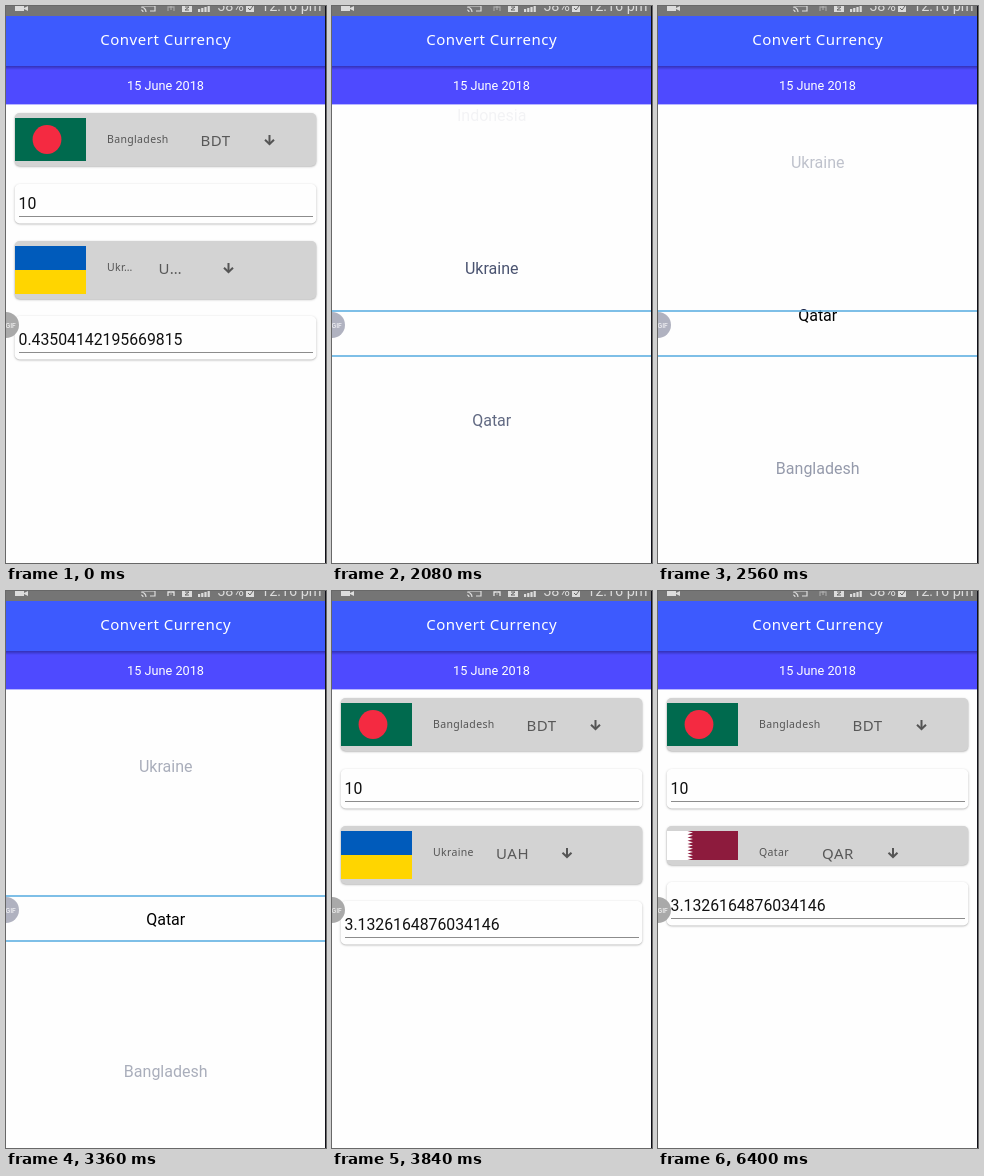
Write an HTML page with a canvas that moves like this. It is 320 by 557 pixels and loops after 9.6 s.

```html
<!DOCTYPE html>
<html lang="en">
<head>
<meta charset="utf-8">
<title>Convert Currency</title>
<style>
html, body { margin: 0; width: 100%; height: 100%; overflow: hidden; background: #fefefe; }
canvas { display: block; width: 320px; height: 557px; }
</style>
</head>
<body>
<canvas id="stage"></canvas>
<script>
const W = 320, H = 557, LOOP = 9600, STEP = 160;
const NOTO = '"Noto Sans", "Open Sans", sans-serif';
const ROBOTO = 'Roboto, Arial, sans-serif';
const canvas = document.getElementById('stage');
const g = canvas.getContext('2d');
const dpr = window.devicePixelRatio || 1;
canvas.width = W * dpr;
canvas.height = H * dpr;

function rect(x, y, w, h, color) {
  g.fillStyle = color;
  g.fillRect(x, y, w, h);
}

function disc(x, y, r, color) {
  g.fillStyle = color;
  g.beginPath();
  g.arc(x, y, r, 0, Math.PI * 2);
  g.fill();
}

function poly(points, color) {
  g.fillStyle = color;
  g.beginPath();
  points.forEach(([x, y]) => g.lineTo(x, y));
  g.fill();
}

function line(points, color, width) {
  g.strokeStyle = color;
  g.lineWidth = width;
  g.beginPath();
  points.forEach(([x, y]) => g.lineTo(x, y));
  g.stroke();
}

function text(str, x, y, size, family, color, align = 'left') {
  g.font = `${size}px ${family}`;
  g.letterSpacing = family === NOTO ? `${size / 30}px` : '0px';
  g.textAlign = align;
  g.fillStyle = color;
  g.fillText(str, x, y);
}

function card(y, h, color) {
  g.save();
  g.shadowColor = 'rgba(0,0,0,.3)';
  g.shadowBlur = 2 * dpr;
  g.shadowOffsetY = 0.8 * dpr;
  g.fillStyle = color;
  g.beginPath();
  g.roundRect(8.7, y, 301.6, h, 5);
  g.fill();
  g.restore();
}

function statusBar(t) {
  const ink = '#dcdcdc';
  rect(0, 0, W, 10, '#757575');
  rect(9, 0, 9, 5, ink);
  poly([[18, 2], [22, 0], [22, 5], [18, 3]], ink);

  line([[136, 0], [149, 0], [149, 5], [144, 5]], ink, 1.2);
  for (const r of [2, 5]) {
    g.beginPath();
    g.arc(135, 6, r, -Math.PI / 2, 0);
    g.stroke();
  }

  const active = t >= 3360 && t < 6400;
  line([[162, 5], [162, 1], [168, 1], [168, 5]], active ? '#e4e4e4' : '#a2a2a2', 1.3);
  line([[165, 0], [165, 4]], '#b5b5b5', 1);

  rect(176, 0, 10, 6, ink);
  line([[179, 1], [183, 1], [179, 4], [183, 4]], '#666', 1);
  for (let i = 0; i < 4; i++) rect(192 + i * 3.2, 3 - i, 2.2, 3 + i, ink);
  text('58%', 211, 5, 14.5, ROBOTO, ink);
  rect(240, 0, 8, 6, ink);
  line([[242, 2], [244, 4], [247, 0]], '#666', 1);
  text('12:16 pm', 255, 5, 14.5, ROBOTO, ink);
}

function header() {
  rect(0, 10, W, 50, '#3d5afe');
  rect(0, 60, W, 38.4, '#4e4aff');
  const shade = g.createLinearGradient(0, 60, 0, 64);
  shade.addColorStop(0, 'rgba(0,0,40,.34)');
  shade.addColorStop(1, 'rgba(0,0,40,0)');
  rect(0, 60, W, 4, shade);
  text('Convert Currency', 159.7, 39, 15, NOTO, '#fff', 'center');
  text('15 June 2018', 159.5, 84, 12.7, ROBOTO, '#fff', 'center');
}

const flags = {
  bangladesh(y, h) {
    rect(9, y, 71, h, '#006a4e');
    disc(41, y + h / 2, 14.4, '#f42a41');
  },
  ukraine(y, h) {
    rect(9, y, 71, h, '#005bbb');
    rect(9, y + h / 2, 71, h / 2, '#ffd500');
  },
  qatar(y, h) {
    rect(9, y, 71, h, '#8d1b3d');
    const edge = [[9, y], [29.5, y]], tooth = h / 9;
    for (let i = 0; i < 9; i++) {
      edge.push([35, y + (i + 0.5) * tooth], [29.5, y + (i + 1) * tooth]);
    }
    poly([...edge, [9, y + h]], '#fff');
  }
};

function arrow(x, y) {
  const ink = '#555';
  rect(x - 1, y - 5, 2, 8, ink);
  line([[x - 4.5, y - 0.3], [x, y + 4], [x + 4.5, y - 0.3]], ink, 2);
}

function countryRow(y, h, flag, name, code, codeX, arrowX) {
  card(y, h, '#d3d3d3');
  flags[flag](y + 5, h - 10);
  text(name, 101, y + 30, 10.5, NOTO, '#555');
  text(code, codeX, y + 33, 15, NOTO, '#585858');
  arrow(arrowX, y + 27);
}

function field(top, bottom, value) {
  card(top, bottom - top - 0.5, '#fefefe');
  text(value, 12.5, bottom - 15, 15.8, ROBOTO, '#111');
  rect(13, bottom - 8, 294, 1, '#8c8c8c');
}

function form(t) {
  countryRow(107, 53, 'bangladesh', 'Bangladesh', 'BDT', 194.5, 263.5);
  field(178, 218, '10');
  const start = t < 1120;
  if (t >= 4960) {
    countryRow(235, 39, 'qatar', 'Qatar', 'QAR', 164, 235);
    field(291, 335, '3.1326164876034146');
  } else {
    if (start) countryRow(235, 58, 'ukraine', 'Ukr…', 'U…', 152.5, 222.5);
    else countryRow(235, 58, 'ukraine', 'Ukraine', 'UAH', 164, 235);
    field(310, 354, start ? '0.43504142195669815' : '3.1326164876034146');
  }
}

const countries = ['Indonesia', 'Ukraine', 'Qatar', 'Bangladesh'];
const GAP = 152.6, MID = 328, BAND_TOP = 305, BAND_BOTTOM = 350;

// Drag, fling past the row, then settle back: [time, offset]
const scrollKeys = [
  [1760, 0], [1920, 61], [2080, 66], [2240, 172], [2400, 172],
  [2560, 171.5], [2720, 169.5], [2880, 168], [3040, 159], [3200, 154], [3360, GAP]
];

function scrollAt(t) {
  const i = scrollKeys.findIndex(k => k[0] > t);
  if (i === 0) return 0;
  if (i < 0) return GAP;
  const [t0, a] = scrollKeys[i - 1], [t1, b] = scrollKeys[i];
  return a + (b - a) * (t - t0) / (t1 - t0);
}

function clipped(y0, y1, draw) {
  g.save();
  g.beginPath();
  g.rect(0, y0, W, y1 - y0);
  g.clip();
  draw();
  g.restore();
}

function picker(t) {
  const scroll = scrollAt(Math.floor(t / STEP) * STEP);
  const list = color => countries.forEach((name, i) => {
    const y = MID + (i - 1) * GAP - scroll;
    const alpha = Math.max(0, 1 - Math.abs(y - MID) / 229.5);
    text(name, 159.7, y + 5.8, 16, ROBOTO, color || `rgba(0,14,55,${alpha})`, 'center');
  });
  clipped(98, BAND_TOP, () => list());
  clipped(BAND_TOP, BAND_BOTTOM, () => list('#000'));
  clipped(BAND_BOTTOM, H, () => list());
  rect(0, BAND_TOP - 0.8, W, 1.6, '#5fb0e2');
  rect(0, BAND_BOTTOM - 0.8, W, 1.6, '#5fb0e2');
}

function draw(t) {
  const picking = t >= 1120 && t < 3840;
  g.setTransform(dpr, 0, 0, dpr, 0, 0);
  rect(0, 0, W, H, '#fefefe');
  statusBar(t);
  header();
  if (picking) picker(t);
  else form(t);
  disc(0, 319, 13, picking ? '#b0b2c0' : '#a9a9a9');
  text('GIF', -0.5, 321.5, 6.8, ROBOTO, '#fff');
  rect(319, 0, 1, H, '#101018');
}

const began = performance.now();
function tick() {
  draw((performance.now() - began) % LOOP);
  requestAnimationFrame(tick);
}
tick();
</script>
</body>
</html>
```
